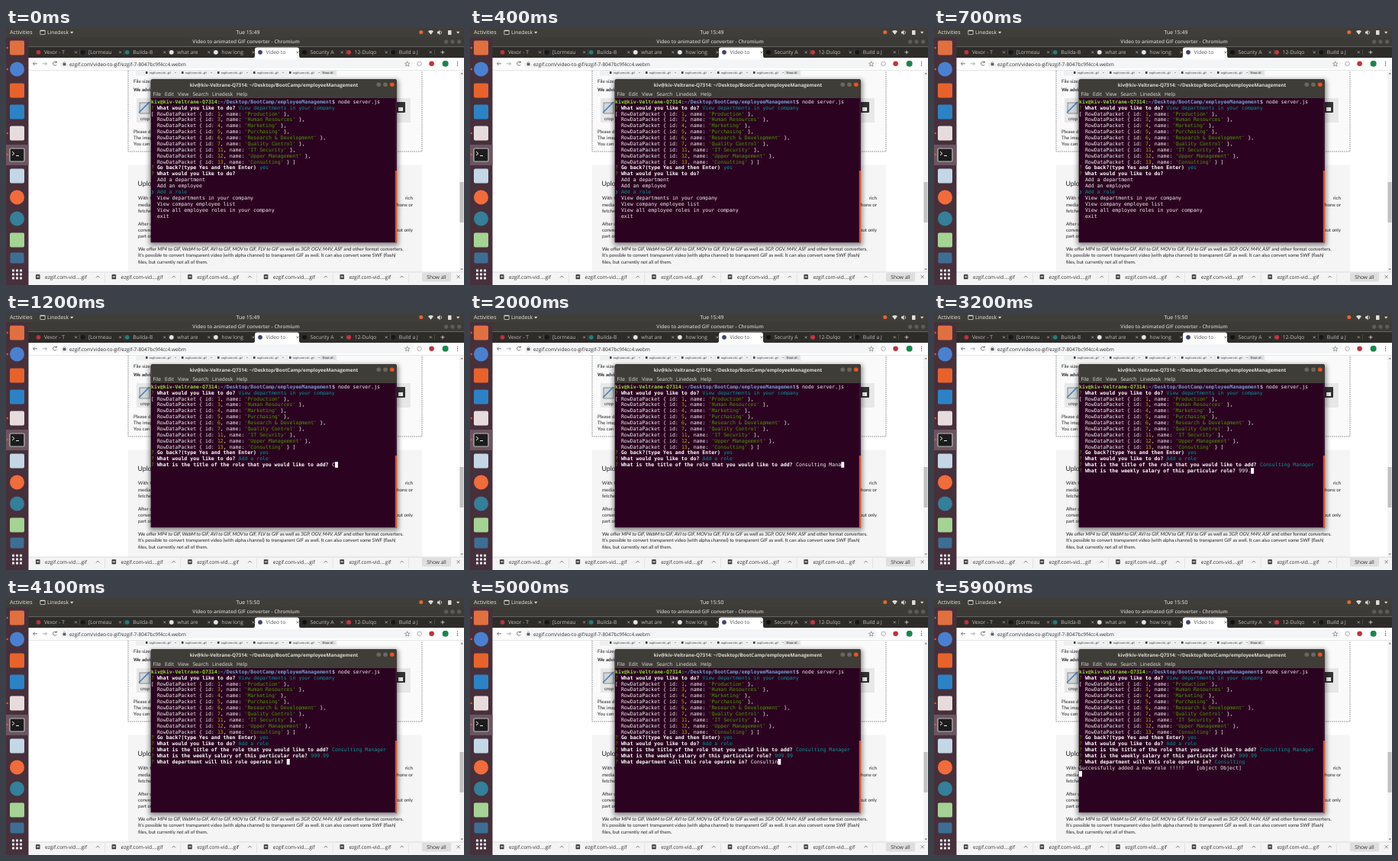
Animation of 600x337 px, one loop 6.1 s. Source, as an HTML page:

```html
<!DOCTYPE html>
<html lang="en">
<head>
<meta charset="utf-8">
<title>Desktop shell session</title>
<style>
  html, body { margin: 0; width: 100%; height: 100%; overflow: hidden; background: #fff; }
  svg { display: block; width: 100vw; height: 100vh; }
  text { white-space: pre; text-rendering: geometricPrecision; font-family: "Open Sans", "Noto Sans", sans-serif; }
  .page text { font-family: Lato, "Open Sans", sans-serif; fill: #222; }
  .shadow { filter: blur(3px); opacity: .45; }
  #lines text { font: 6.56px "DejaVu Sans Mono", "Liberation Mono", monospace; fill: #f2eff1; }
  #lines .bold { font-weight: bold; fill: #fff; }
  #lines .user { font-weight: bold; fill: #8ae234; }
  #lines .path { font-weight: bold; fill: #729fcf; }
  #lines .mark, #lines .str { fill: #4e9a06; }
  #lines .num { fill: #c4a000; }
  #lines .reply { fill: #06989a; }
</style>
</head>
<body>
<svg id="stage" viewBox="0 0 600 337" preserveAspectRatio="none"></svg>
<script>
const LOOP = 6100, STEP = 100;
const COL = 3.95, ROW = 7.88, LEFT = 190, BASE = 98.8;
const HOST = 'kiv@kiv-Veltrane-Q7314';
const FOLDER = '~/Desktop/BootCamp/employeeManagement';

const esc = s => s.replace(/&/g, '&amp;').replace(/</g, '&lt;');
const rect = (x, y, w, h, fill, more = '') =>
  `<rect x="${x}" y="${y}" width="${w}" height="${h}" fill="${fill}" ${more}/>`;
const dot = (x, y, r, fill, more = '') => `<circle cx="${x}" cy="${y}" r="${r}" fill="${fill}" ${more}/>`;
const line = (d, stroke, width = 0.8, more = '') =>
  `<path d="${d}" fill="none" stroke="${stroke}" stroke-width="${width}" ${more}/>`;
const shape = (d, fill) => `<path d="${d}" fill="${fill}"/>`;
const label = (x, y, s, size, fill, more = '') =>
  `<text x="${x}" y="${y}" font-size="${size}" fill="${fill}" ${more}>${esc(s)}</text>`;
const cross = (x, y, r, color) => line(`M${x - r} ${y - r}l${2 * r} ${2 * r}m0 ${-2 * r}l${-2 * r} ${2 * r}`, color, 0.7);
const MIDDLE = 'text-anchor="middle"', END = 'text-anchor="end"', BOLD = 'font-weight="bold"';

function topPanel() {
  return rect(0, 0, 600, 12, '#403e39') +
    label(5, 8.3, 'Activities', 7.2, '#e6e6e6') +
    rect(44.5, 2.8, 7, 6, '#ddd', 'rx=".8"') + rect(45.3, 4.2, 5.4, 3.8, '#333') +
    label(54, 8.3, 'Linedesk', 6.8, '#e6e6e6') + shape('M84 4.7h4.4l-2.2 2.7z', '#ddd') +
    `<text id="clock" x="317" y="8.3" font-size="6.9" fill="#f0f0f0" text-anchor="middle"></text>` +
    dot(543.8, 5.6, 2.5, '#e9662c') + shape('M553 4.2q3.5-2.6 7 0l-3.5 4.6z', '#ddd') +
    shape('M565 4.5h1.5l2-1.9v6.6l-2-1.9H565z', '#ddd') + line('M569.8 3.8q1.8 2 0 4', '#ddd') +
    rect(579, 3, 4.5, 6, '#ddd', 'rx=".7"') + shape('M590 4.7h4.4l-2.2 2.7z', '#ddd');
}

function browser() {
  const tabs = [['#c0303a', 'Vexor - T'], ['#15171a', '[Lormeau'], ['#1f7f7a', 'Builda-B'],
    ['#e4e4e4', 'what are'], ['#e4e4e4', 'how long'], ['#3d4470', 'Video to'],
    ['#111', 'Security A'], ['#d0333d', '12-Dulqo'], ['#15171a', 'Build a J']];
  let out = rect(29, 12, 571, 12.5, '#3c3b37') +
    label(314.5, 20.3, 'Video to animated GIF converter - Chromium', 6.5, '#cfcbc2', MIDDLE + ' font-weight="600"') +
    [576.6, 585, 593.6].map(x => dot(x, 18, 2.7, '#5d5b54')).join('') +
    rect(29, 24.5, 571, 14.5, '#2d2c29') +
    shape('M324 39q2 0 2-3v-8q0-2.5 3-2.5h52q3 0 3 2.5v8q0 3 2 3z', '#fff');
  tabs.forEach(([color, name], i) => {
    const x = 50 + 58.1 * i, active = i === 5;
    out += dot(x - 7.5, 31.8, 2.9, color) + label(x, 34.2, name, 6.7, active ? '#555' : '#c0bfba') +
      cross(x + 41.5, 31.8, 1.5, active ? '#555' : '#bbb');
    if (!active && i !== 4) out += rect(x + 46.5, 28, 0.5, 7, '#66645f');
  });
  return out + line('M569.5 31.8h5m-2.5-2.5v5', '#ddd') +
    rect(29, 39, 571, 17, '#fff') + rect(71, 41, 462, 12, '#f4f5f6', 'rx="6"') +
    line('M41 46.8h-5.5m2.2-2.2l-2.2 2.2 2.2 2.2', '#555') + line('M48 46.8h5.5m-2.2-2.2l2.2 2.2-2.2 2.2', '#999') +
    line('M66 45a2.5 2.5 0 1 0 .2 3M66.3 43.3v2h-2', '#555') +
    rect(74.5, 46, 4, 3.3, '#5f6368') + line('M75.5 46v-1q1-1.5 2 0v1', '#5f6368', 0.6) +
    label(83, 49.5, 'ezgif.com/video-to-gif/ezgif-7-8047bc9f4cc4.webm', 6.55, '#333') +
    line('M525.7 43.8l.9 2.2 2.3.2-1.8 1.5.6 2.3-2-1.3-2 1.3.6-2.3-1.8-1.5 2.3-.2z', '#666', 0.6) +
    dot(541.6, 46.8, 2.8, '#fff', 'stroke="#999" stroke-width=".8"') +
    dot(557.6, 46.8, 3.3, '#c5303a') + dot(575.6, 46.8, 4, '#16884b') +
    [44.4, 46.8, 49.2].map(y => dot(591.5, y, 0.7, '#555')).join('') +
    rect(29, 55.4, 571, 0.6, '#d5d5d5');
}

function page() {
  const text = (x, y, s, more = '') => label(x, y, s, 6.2, '#222', more);
  let out = rect(29, 56, 571, 264, '#fff') + rect(160, 56, 385, 106, '#fafafa') +
    line('M160 56V162H545V56', '#555', 0.7, 'stroke-dasharray="1.5 1.2"') +
    rect(170, 56, 264, 6.5, '#eeeff0');
  for (let i = 0; i < 5; i++) {
    const x = 183 + 47 * i;
    out += rect(x, 57, 2.5, 3, '#444') + label(x + 5, 59.8, 'ezgif.com-vid....gif', 3.5, '#333') +
      line(`M${x + 38} 59l1-1 1 1`, '#555', 0.5);
  }
  out += rect(412, 56, 20, 5, '#ddd') + label(414.5, 59.8, 'Show all', 3.8, '#333') +
    text(167, 72, 'File size: 1.2') + text(167, 83.4, 'We advise', BOLD) +
    rect(171, 92, 25, 32, '#e8e8e8') + rect(175, 98, 13, 14, '#d2d7dc', 'stroke="#777" stroke-width=".8"') +
    line('M174 111l14-14', '#4380b5', 1.6) + text(176, 121, 'crop') +
    rect(508, 92, 22, 32, '#e8e8e8') + rect(510, 97, 13, 14, '#333', 'rx="1"') + rect(514, 104, 6, 5, '#eee') +
    text(167, 138, 'Please do not') + text(167, 146, 'The image') + text(167, 154, 'You can save') +
    rect(160, 179.5, 385, 140.5, '#f5f5f5') + label(172.5, 207, 'Upload video', 8.8, '#333');
  [[225, 'With this', 'rich'], [233.6, 'media files', 'phone or'], [241.5, 'fetched'],
    [259.2, 'After upload'], [267, 'converter', 'but only'], [275.2, 'part of it']]
    .forEach(([y, start, end]) => { out += text(173, y, start) + (end ? text(533, y, end, END) : ''); });
  const italic = s => `<tspan font-style="italic">${s}</tspan>`;
  return `<g class="page">${out}<text x="173" y="292" font-size="6.25">We offer ` +
    italic('MP4 to GIF, WebM to GIF, AVI to GIF, MOV to GIF, FLV to GIF') + ' as well as ' +
    italic('3GP, OGV, M4V, ASF') + ' and other format converters.</text>' +
    text(173, 300.4, 'It’s possible to convert transparent video (with alpha channel) to transparent GIF as well. It can also convert some SWF (flash)') +
    text(173, 309.2, 'files, but currently not all of them.') +
    rect(594, 56, 6, 264, '#f4f4f4') + rect(594.5, 202, 5, 53, '#c1c1c1') +
    shape('M595.5 60.5h3.4l-1.7-2z', '#777') + shape('M595.5 315.5h3.4l-1.7 2z', '#777') + '</g>';
}

function downloads() {
  let out = rect(29, 320, 571, 17, '#f4f4f4') + rect(29, 319.7, 571, 0.6, '#c8c8c8');
  for (let i = 0; i < 5; i++) {
    const x = 39 + 99.6 * i;
    out += rect(x, 323.2, 5.5, 6, '#333', 'rx=".5"') + rect(x + 1, 325, 3.5, 2.4, '#aaa') +
      label(x + 12, 328.8, 'ezgif.com-vid....gif', 6.6, '#333') +
      line(`M${x + 79} 327.4l2.2-2.2 2.2 2.2`, '#555') + rect(x + 90, 321.5, 0.5, 13, '#d5d5d5');
  }
  return out + rect(545, 320.8, 38, 11.6, '#dedede', 'rx="1.5"') +
    label(564, 328.8, 'Show all', 6.6, '#333', MIDDLE) + cross(592.6, 326.3, 2, '#555');
}

function dock() {
  const colors = ['#e0703f', '#4a80d0', '#e8622c', '#2b83c6', '#e6dcdc', '', '#c3d7e6', '#f26b3a', '#347f99', '#a5d394'];
  let out = rect(0, 12, 29.5, 325, '#46303b') + rect(0, 153, 29.5, 27, '#6a5560');
  colors.forEach((color, i) => {
    const y = 26 + 28 * i;
    if (!color) {
      out += rect(5, y - 8, 19, 17, '#1c1c1c', 'rx="1.5" stroke="#bbb" stroke-width="1.2"') +
        line(`M8 ${y - 4}l3 2.5-3 2.5m5 .5h4`, '#eee', 1);
    } else if ([1, 7, 8].includes(i)) out += dot(14.5, y, 9.5, color);
    else out += rect(5, y - 9.5, 19, 19, color, 'rx="2"');
    if ([0, 1, 4, 5].includes(i)) out += dot(1.8, y, 1.2, '#e95420');
  });
  out += rect(5.5, 294.5, 18, 14, '#3d6f94', 'rx="2"');
  for (let i = 0; i < 9; i++)
    out += rect(8 + 5 * (i % 3), 316.5 + 5 * Math.floor(i / 3), 3, 3, '#eee', 'rx=".6"');
  return out;
}

function shellWindow() {
  const menus = [[192.5, 'File'], [208, 'Edit'], [225, 'View'], [244.5, 'Search'], [270, 'Linedesk'], [302, 'Help']];
  return rect(188, 68, 326, 217, '#000', 'class="shadow"') +
    shape('M189.7 281.3V70q0-3 3-3H509q3 0 3 3V281.3z', '#2b0320') +
    shape('M189.7 92V70q0-3 3-3H509q3 0 3 3V92z', '#3f3d38') +
    label(351, 76.8, `${HOST}: ${FOLDER}`, 6.3, '#dfdbd2', MIDDLE + ' ' + BOLD) +
    dot(488.2, 74.2, 2.8, '#6b6860') + dot(497, 74.2, 2.8, '#6b6860') + dot(505.8, 74.2, 2.8, '#e95420') +
    menus.map(([x, s]) => label(x, 88.8, s, 6.6, '#e4e0d8')).join('') +
    rect(509.8, 92, 2.2, 189.3, '#3a1530') + rect(509.8, 187, 2.2, 94.3, '#d4552f') + '<g id="lines"></g>';
}

// A shell row is a list of [text, class] runs.
const packets = [[1, 'Production'], [3, 'Human Resources'], [4, 'Marketing'], [5, 'Purchasing'],
  [6, 'Research & Development'], [7, 'Quality Control'], [11, 'IT Security'],
  [12, 'Upper Management'], [13, 'Consulting']];
const ask = (question, answer, cls = 'reply') => [['? ', 'mark'], [question + ' ', 'bold'], [answer, cls]];
const TODO = 'What would you like to do?';
const history = [
  [[HOST, 'user'], [':', ''], [FOLDER, 'path'], ['$ node server.js', '']],
  ask(TODO, 'View departments in your company'),
  ...packets.map(([id, name], i) => [[(i ? ' ' : '[') + ' RowDataPacket { id: ', ''], [String(id), 'num'],
    [', name: ', ''], [`'${name}'`, 'str'], [i === packets.length - 1 ? ' } ]' : ' },', '']]),
  ask('Go back?(type Yes and then Enter)', 'yes')
];
const choices = ['Add a department', 'Add an employee', 'Add a role', 'View departments in your company',
  'View company employee list', 'View all employee roles in your company', 'exit'];

const even = (start, gap) => (_, i) => start + gap * i;
const prompts = [
  { question: 'What is the title of the role that you would like to add?', answer: 'Consulting Manager',
    from: 800, to: 2500, keys: even(1200, 800 / 14) },
  { question: 'What is the weekly salary of this particular role?', answer: '999.99',
    from: 2500, to: 3800, keys: (_, i) => [2700, 2900, 3000, 3200, 3400, 3500][i] },
  { question: 'What department will this role operate in?', answer: 'Consulting',
    from: 3800, to: 5500, keys: even(4300, 85) }
];

function rowsAt(t) {
  const rows = [...history];
  if (t < prompts[0].from) {
    rows.push(ask(TODO, ''));
    choices.forEach((s, i) => rows.push(i === 2 ? [['❯ ', 'reply'], [s, 'reply']] : [['  ' + s, '']]));
    return { rows, cursor: false };
  }
  rows.push(ask(TODO, 'Add a role'));
  for (const { question, answer, from, to, keys } of prompts) {
    if (t < from) break;
    const typed = [...answer].filter((c, i) => keys(c, i) <= t + 0.01).join('');
    rows.push(t < to ? ask(question, typed, '') : ask(question, answer));
  }
  if (t >= prompts[2].to) rows.push([['Successfully added a new role !!!!!    [object Object]', '']], []);
  return { rows, cursor: true };
}

function drawRows({ rows, cursor }) {
  let out = '', col = 0;
  rows.forEach((runs, r) => {
    col = 0;
    for (const [s, cls] of runs) {
      out += `<text class="${cls}" x="${LEFT + col * COL}" y="${BASE + r * ROW}">${esc(s)}</text>`;
      col += s.length;
    }
  });
  if (cursor) out += rect(LEFT + col * COL, BASE + (rows.length - 1) * ROW - 6, COL, 7.6, '#fff');
  return out;
}

const stage = document.getElementById('stage');
stage.innerHTML = page() + browser() + downloads() + dock() + topPanel() + shellWindow();
const clock = document.getElementById('clock'), lines = document.getElementById('lines');
const begin = performance.now();
let shown = -1;

function update() {
  const t = Math.floor(((performance.now() - begin) % LOOP) / STEP) * STEP;
  if (t !== shown) {
    shown = t;
    clock.textContent = t < 2500 ? 'Tue 15:49' : 'Tue 15:50';
    lines.innerHTML = drawRows(rowsAt(t));
  }
  requestAnimationFrame(update);
}
update();
</script>
</body>
</html>
```
